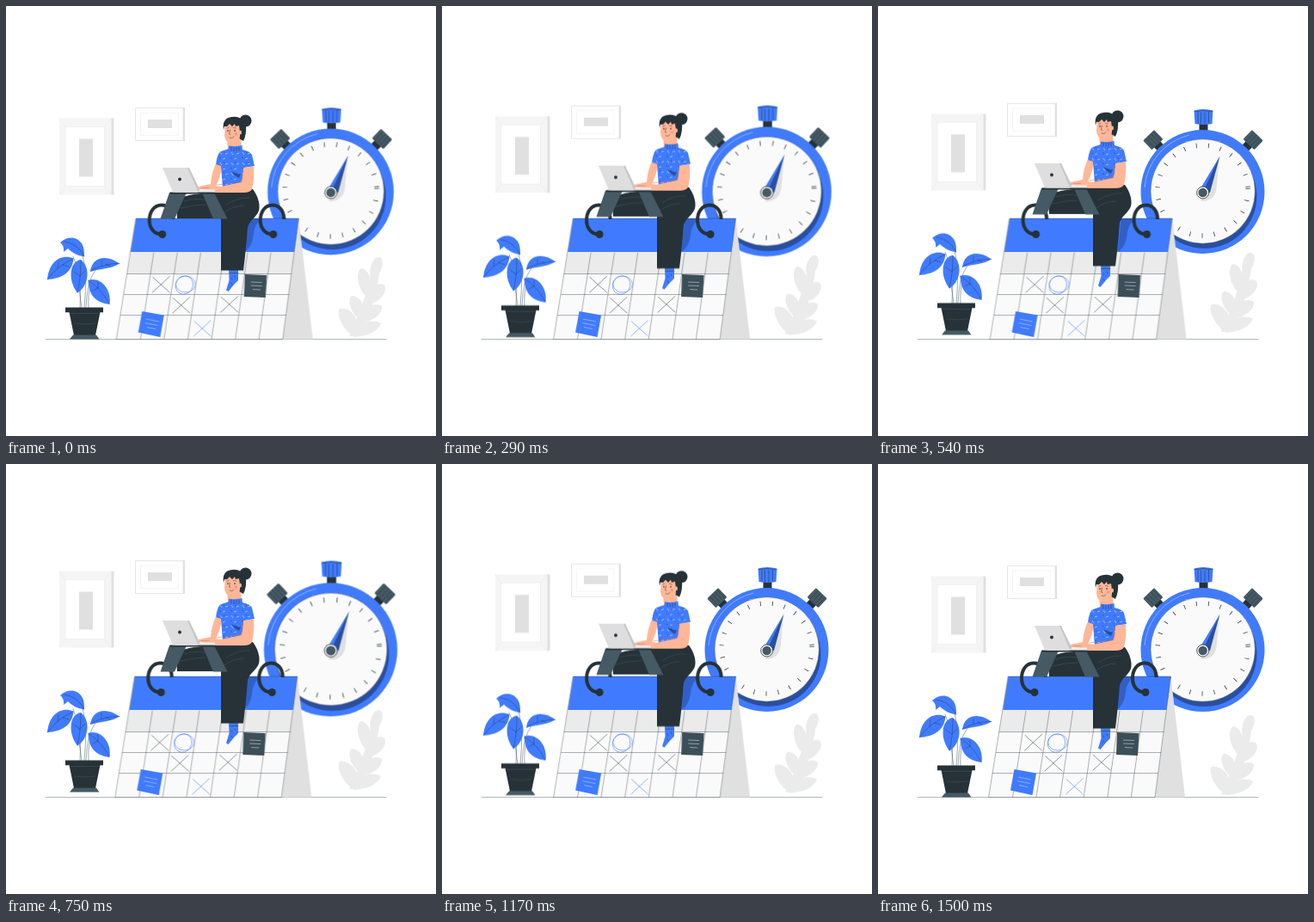
These frames come from a looping animation (500 by 500 pixels, 1540 ms). An HTML page without scripts:

```html
<!DOCTYPE html>
<html lang="en">
<head>
<meta charset="utf-8">
<title>Deadline planning</title>
<style>
  html, body { margin: 0; width: 100%; height: 100%; overflow: hidden; background: #fff; }
  svg { display: block; width: 100vw; height: 100vh; }

  .blue { fill: #407bff; }
  .dark { fill: #263238; }
  .slate { fill: #455a64; }
  .skin { fill: #ffb798; }
  .grey { fill: #e0e0e0; }
  .pale { fill: #ebebeb; }
  .line { fill: none; stroke: #263238; stroke-width: .5; stroke-linecap: round; }
  .light { fill: none; stroke: #b4ccff; stroke-width: .6; }
  .scribble { fill: none; stroke: #407bff; stroke-width: .55; }

  .float, .beat, .shake { animation: 1540ms linear -40ms infinite; }
  .float { animation: float 770ms cubic-bezier(.37, 0, .63, 1) -40ms infinite alternate; }
  .beat { animation-name: beat; transform-origin: 378px 217px; }
  .shake { animation-name: shake; }

  @keyframes float { to { transform: translateY(-6px); } }
  @keyframes beat {
    0%, 28%, 39%, 63%, 100% { transform: scale(1); }
    14% { transform: scale(1.1); }
    51% { transform: scale(1.08); }
  }
  @keyframes shake {
    0%, 100% { transform: none; }
    10%, 90% { transform: translateX(-1px); }
    20%, 80% { transform: translateX(2px); }
    30%, 70% { transform: translateX(-4px); }
    50% { transform: translateX(-2.5px); }
    40%, 60% { transform: translateX(3.2px); }
  }
</style>
</head>
<body>
<svg viewBox="0 0 500 500">
  <defs>
    <pattern id="knit" width="13" height="12" patternUnits="userSpaceOnUse">
      <rect class="blue" width="13" height="12"/>
      <path d="M2 2l2 3M8 4l3-1M5 10l3-1" stroke="#d5e2ff" stroke-width=".6"/>
      <path d="M6 1l1 2M1 8l2 1" stroke="#263238" stroke-width=".4"/>
    </pattern>
    <g id="hook">
      <path d="M194.500 248C194.500 237 188 231.500 181 231.500C172 231.500 167 240 167 249C167 258 172 265 181 265.500" fill="none" stroke="#263238" stroke-width="4"/>
      <circle class="dark" cx="182" cy="265.500" r="4.500"/>
    </g>
    <path id="cross" d="M-9.500-8.500L10 9M10-9.500L-10 9"/>
    <g id="sideKnob">
      <rect class="dark" x="-5" y="-79" width="10" height="11"/>
      <rect class="slate" x="-9" y="-92" width="18" height="15" rx="1.500"/>
      <path class="line" d="M-5-91v13M-1-91v13M3-91v13M6.500-91v13"/>
    </g>
  </defs>

  <!-- Wall frames -->
  <g class="float">
    <path fill="#f5f5f5" d="M62 130.500h61v89H62z"/>
    <path class="grey" d="M122.500 130.500h3v89h-3z"/>
    <path fill="#fff" stroke="#ebebeb" stroke-width=".6" d="M69 140.500h45.500v69H69z"/>
    <path stroke="#e8e8e8" stroke-width=".5" d="M62 130.500l7 10M122.500 130.500l-8 10M62 219.500l7-10M122.500 219.500l-8-10"/>
    <path class="grey" d="M85 154.500h16v44H85z"/>
    <path fill="#fff" stroke="#e0e0e0" stroke-width=".8" d="M150.500 118.500h56v38h-56z"/>
    <path class="grey" d="M205.700 118h2.300v39h-2.300z"/>
    <path fill="#fff" stroke="#f0f0f0" stroke-width=".6" d="M156.500 124h43.500v26.500h-43.500z"/>
    <path class="grey" d="M165 132h28v10h-28z"/>
  </g>

  <path class="line" d="M46 387.500H442" stroke-opacity=".7"/>

  <!-- Stopwatch -->
  <g class="beat">
    <use href="#sideKnob" transform="translate(378 217) rotate(-43.500)"/>
    <use href="#sideKnob" transform="translate(378 217) rotate(43.500)"/>
    <path class="dark" d="M373.500 136h10v10h-10z"/>
    <path class="blue" d="M367.500 121.500Q378 118.500 389.500 121.500L388.500 137Q378 139 368.500 137z"/>
    <path class="line" d="M368 122.500Q378 120.500 389 122.500M372 123v13M375.500 124v13M380 124v13M384.500 123v13"/>
    <circle class="blue" cx="377.500" cy="216" r="72"/>
    <path class="light" d="M310 211A68.500 68.500 0 0 1 362 150"/>
    <circle cx="379.500" cy="221" r="61" fill="#294f9f"/>
    <circle cx="377.700" cy="215.500" r="60.700" fill="#fafafa" stroke="#263238" stroke-width=".4"/>
    <circle cx="377.700" cy="214.500" r="52.500" pathLength="360" fill="none" stroke="#263238" stroke-width="5.500"
            stroke-dasharray=".8 14.750" transform="rotate(-2.900 377.700 214.500)"/>
    <path class="grey" d="M397 176L393.500 213Q391 227 376 227L378 216z"/>
    <path class="blue" d="M397.500 174.500L374.500 213L380 216z"/>
    <path fill="#294f9f" d="M397.500 174.500L378 216L386 217z"/>
    <circle cx="377.700" cy="217" r="7" fill="#fafafa" stroke="#263238" stroke-width=".8"/>
    <circle class="slate" cx="377.700" cy="217" r="5.200"/>
  </g>

  <!-- Grey leaf -->
  <g class="float pale">
    <path d="M399 384Q416 350 427 302L435 304Q429 352 410 384z"/>
    <path d="M424 318C421 305 427 291 434 292C441 294 438 310 427 318z"/>
    <path d="M421 340C408 330 406 308 413 305C423 306 428 325 424 340z"/>
    <path d="M417 346C419 330 433 319 440 325C444 333 434 346 417 348z"/>
    <path d="M412 365C398 356 397 337 403 337C413 338 419 350 416 365z"/>
    <path d="M409 367C414 350 430 343 437 349C438 359 425 368 409 369z"/>
    <path d="M405 385C389 375 384 356 388 352C401 350 412 365 410 378z"/>
    <path d="M404 385C405 368 425 363 436 369C431 381 416 384 404 385z"/>
  </g>

  <!-- Potted plant -->
  <g class="float">
    <g fill="none" stroke="#455a64" stroke-width=".5">
      <path d="M86 351Q89 315 78 291M88 351Q86 335 84 324M91 351Q95 310 89 290M93 351Q94 320 104 307M96 351Q95 335 99 323"/>
    </g>
    <g class="blue">
      <path d="M63 275C73 266 83 269 88 276C91 281 91 286 91 291.500C82 290 76 286 72 282L67 286Q68 279 63 275z"/>
      <path d="M78.500 293.500C65 288 50 296 48 318C63 317 77 311 78.500 293.500z"/>
      <path d="M87 295C73 297 72 320 83 333.500C96 326 99 304 87 295z"/>
      <path d="M98 309C100 292 116 288 132 299.500C122 306 110 305 98 309z"/>
      <path d="M95.500 319C108 314 123 327 120.500 347C105 345 96 337 95.500 319z"/>
    </g>
    <path class="line" stroke-opacity=".8" d="M68 274Q83 276 91 291M78 294Q60 302 48 318M87 296Q87 318 83 333M98 308Q115 299 132 299.500M96 319Q111 329 120 346M60 305l1-7M66 301l7 2M86 314l-7-5M86 314l6-6M111 302l0-6M116 300l5 3M107 328l0-7M107 328l-6 3"/>
    <path class="dark" d="M69 350.500h44v5.800H69zM73.500 356h36L104 383H79z"/>
    <path class="slate" d="M78 382.500h27l3.500 5H74z"/>
    <path class="line" style="stroke:#455a64" d="M75 357.500h33M80 369Q92 371 104 369"/>
  </g>

  <!-- Calendar -->
  <g class="shake">
    <path class="grey" d="M340.500 247L357 387.500H322z"/>
    <path fill="#fafafa" d="M151.500 247h189L322 387.500H129z"/>
    <path class="pale" d="M145.200 286h190.200L332 311.500H141z"/>
    <path class="blue" d="M151.500 247h189L335.400 286H145.200z"/>
    <path fill="#315fc5" d="M281 247h18Q289 252 288 266Q286 281 277 286z"/>
    <path class="line" d="M151.500 247h189L322 387.500H129zM141 311.500H332M137.500 335.500H329M133.500 359.500H325.500M172 287L156.600 387M199.400 287L184 387M226.600 287L211.700 387M253.800 287L239.300 387M281 287L267 387M308.200 287L294.400 387" stroke-opacity=".75"/>
    <g class="line">
      <use href="#cross" x="180.500" y="324"/>
      <use href="#cross" x="204" y="348"/>
      <use href="#cross" x="260" y="347"/>
    </g>
    <g class="scribble">
      <use href="#cross" x="228.500" y="375"/>
      <ellipse cx="209" cy="323.500" rx="11.300" ry="9.500"/>
      <ellipse cx="207.500" cy="324.500" rx="10" ry="11" transform="rotate(30 207.500 324.500)"/>
    </g>
    <path fill="#3c4f58" d="M278 312l25.500 1L302 339l-25-1z"/>
    <path class="light" style="stroke:#cfd8dc" d="M285 321l13 .5M285 325l13 .5M287 329.500l9 .5"/>
    <path class="blue" d="M158.500 355l25.500 4.500L179.500 385L154 379.500z"/>
    <path class="light" d="M163 364l15 3M162 368.500l15 3M164 373.500l10 2"/>
    <use href="#hook"/>
    <use href="#hook" x="129"/>
  </g>

  <!-- Woman with laptop -->
  <g class="float">
    <path class="dark" d="M256 217C240 217 216 218 206 222C200 226 198 238 199 247H252z"/>
    <path class="line" style="stroke:#455a64" d="M207 227Q224 221 242 228M203 235Q218 231 232 231"/>
    <path class="blue" d="M259 306h11V319L265 324L258.500 332L256 330.500L259.500 319z"/>
    <path class="line" d="M260 310.500h10M262 316l1 2M266 314l1 2M262 322l1 2"/>
    <path class="dark" d="M251 214L287 213C293 221 296 231 294 238C291 246 284 248 281 257Q279 284 276 307.500H250V236Q249 222 251 214z"/>
    <path class="line" style="stroke:#455a64" d="M256 231Q270 222 283 223M254 240Q262 233 276 232"/>

    <path class="slate" d="M190 217h20L196 247.500H179.500zM228 217h14L257.500 247.500H241z"/>
    <path class="dark" d="M190.500 216.500H256v2H190.500z"/>

    <path class="skin" d="M245 181L251 187Q249 200 244 209L231 213H223L224 210L238 207Q239 193 245 181z"/>
    <path class="skin" d="M257 153h16l1 14h-16z"/>
    <path fill="url(#knit)" d="M259 166Q267 164 275 167Q284 169 286 173L289 186L277 188L276 205L274 213Q262 215 252 212L250 186L244 184Q246 170 250 169z"/>
    <path class="blue" d="M259 162.500Q267 164 274.500 162L275 169Q266 171 258.500 168.500z"/>
    <path class="line" d="M262 164v4M265 164.500v4M268 164.500v4M271 164v4"/>
    <path fill="#294f9f" d="M262 192Q268 196 273 195L271 200Q265 197 262 192z"/>
    <path class="skin" d="M276 188L288 186.500Q289 202 286 213Q284 217 276 217H245L237 215L223 212.500Q226 208.500 240 208.500L250 210L273 205Q276 199 276 188z"/>
    <path class="line" style="stroke:#c56f56" d="M245 208L274 204.500M227 211.500h9M275 188l-1 16"/>

    <path class="pale" d="M224 213.500h19v2.500h-19z"/>
    <path fill="#c7c7c7" d="M184 188H213L225.500 214L222 217H197z"/>
    <path fill="#dedede" d="M182 188H211L223.500 216.500H194z"/>
    <circle class="dark" cx="202" cy="201.500" r="1.900"/>

    <circle class="dark" cx="278.500" cy="133.500" r="7"/>
    <path class="dark" d="M271 133L279 138Q280 149 276 157L271 154z"/>
    <path class="skin" d="M255 137H272V151Q272 160 263 160Q254 159 254 150z"/>
    <path class="dark" d="M253 144Q251 132 260 129.500Q270 127 277 134Q279 138 278 150L273 154L271 139L267 140L266 137L263 140L260 137L257 140L254 140z"/>
    <ellipse class="skin" cx="272.500" cy="147" rx="1.500" ry="2.500"/>
    <path class="line" d="M257 142l2-.5M264.500 141.500l3 .5M260.500 144l-1 5 1.500 .5M260 153Q263 155 265 152"/>
    <path class="dark" d="M257.500 144h1v2h-1zM265.500 144h1v2h-1z"/>
    <circle cx="267.500" cy="149" r="1.800" fill="#ec7d66" opacity=".5"/>
  </g>
</svg>
</body>
</html>
```
